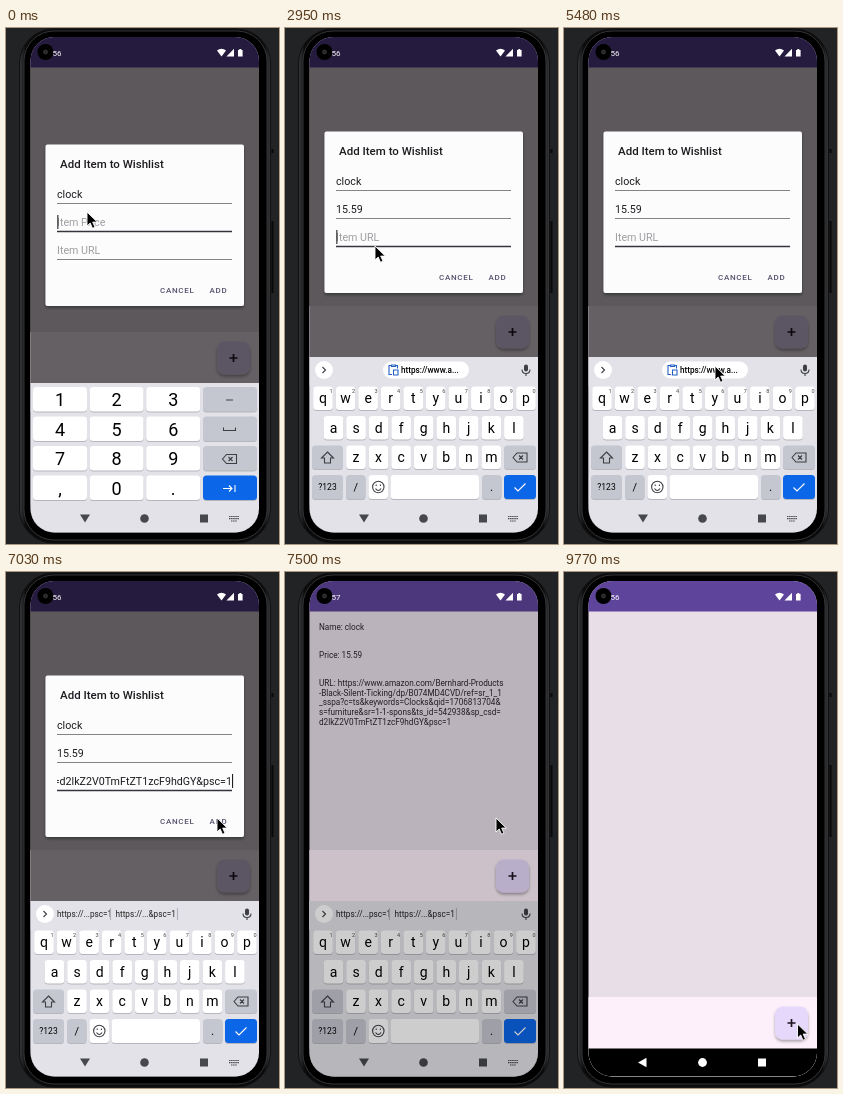
Animation of 273 by 516 pixels, one loop 9790 ms. Source, as an HTML page:

```html
<!DOCTYPE html>
<html lang="en">
<head>
<meta charset="utf-8">
<title>Wishlist demo</title>
<style>
html, body { margin: 0; width: 100%; height: 100%; overflow: hidden; background: #222325; }
svg { display: block; width: 273px; height: 516px; font-family: Roboto, "Liberation Sans", sans-serif; }
text { white-space: pre; }
.mid { text-anchor: middle; }
.medium { font-weight: 500; }
.field { font-size: 10.7px; fill: #1d1b1f; }
.hint { fill: #a09ea1; }
.button { font-size: 8px; font-weight: 500; letter-spacing: .7px; fill: #554f6b; }
.item { font-size: 8.2px; fill: #2a262c; }
.line { fill: none; stroke: #3d3f45; stroke-width: 1.1; }
</style>
</head>
<body>
<svg viewBox="0 0 273 516">
  <defs>
    <clipPath id="screen"><rect x="24.5" y="9" width="228.5" height="495.5" rx="24"/></clipPath>
    <clipPath id="entry"><rect x="51" y="190" width="175" height="50"/></clipPath>
    <filter id="shadow" x="-30%" y="-30%" width="160%" height="170%">
      <feDropShadow dx="0" dy="2" stdDeviation="1.6" flood-opacity=".35"/>
    </filter>
    <linearGradient id="edge">
      <stop offset="0" stop-color="#3a3b3d"/><stop offset=".025" stop-color="#0b0b0c"/>
      <stop offset=".975" stop-color="#0b0b0c"/><stop offset="1" stop-color="#38393b"/>
    </linearGradient>
  </defs>

  <rect width="273" height="516" fill="#222325"/>
  <path d="M266.5 121v4M266.5 193v72" stroke="#080809" stroke-width="2"/>
  <rect x="13.5" y="1" width="251" height="514" rx="34" fill="url(#edge)" stroke="#101011"/>
  <rect x="18" y="3" width="243" height="509" rx="30" fill="#000" stroke="#3f4042" stroke-width=".8"/>

  <g clip-path="url(#screen)">
    <rect x="24" y="9" width="230" height="496" fill="#e8dee8"/>
    <rect x="24" y="9" width="230" height="30.5" fill="#5e449b"/>
    <g id="items"></g>
    <g id="bottom">
      <rect x="24" y="425" width="230" height="80" fill="#fdf0fa"/>
      <rect x="211" y="434.5" width="33" height="33" rx="8" fill="#e6d8fb" filter="url(#shadow)"/>
      <path d="M223.5 451h8M227.5 447v8" stroke="#1a1520" stroke-width="1.7"/>
    </g>
    <rect id="pageDim" x="24" y="9" width="230" height="496"/>
    <rect x="24" y="476.5" width="230" height="28"/>
    <g fill="#fff"><path d="M74 490.500l8.500-4.700v9.400z"/><circle cx="138.500" cy="490.500" r="4.400"/><rect x="194" y="486.500" width="8" height="8"/></g>
    <g id="keyboard">
      <rect id="tray" x="24" width="230" height="200" fill="#e2e2e8"/>
      <g id="numbers"></g>
      <g id="letters"></g>
      <g fill="#46484d">
        <path d="M74 486.500h10l-5 8z"/><circle cx="138.500" cy="490.500" r="4.300"/><rect x="194" y="486.500" width="8" height="8"/>
        <path d="M223 488.500h10M223 490.700h10M225 493h6" stroke="#46484d" stroke-width="1.200" stroke-dasharray="1.500 .6"/>
      </g>
    </g>
    <rect id="fullDim" x="24" y="9" width="230" height="496"/>
    <circle cx="39.500" cy="24" r="8"/>
    <circle cx="39.500" cy="24" r="2" fill="#252729" stroke="#3d4043" stroke-width=".7"/>
    <g fill="#fff">
      <text id="clock" x="46.500" y="28" font-size="8"></text>
      <path d="M211 22.500q4.500-3.500 9 0l-4.500 6zM228 20.800v7.700h-7.500zM232 22h1.300v-1h2v1h1.300v6.500h-4.600z"/>
    </g>
  </g>

  <g id="dialog">
    <rect x="39.500" y="116.500" width="198.500" height="161.500" rx="2" fill="#fdfcfd" filter="url(#shadow)"/>
    <text class="medium" x="54" y="139.500" font-size="11.500" fill="#1d1b1f">Add Item to Wishlist</text>
    <text class="field" x="51" y="170">clock</text>
    <text class="field" id="price" x="51" y="198"></text>
    <g clip-path="url(#entry)"><text class="field" id="url" y="226"></text></g>
    <path id="rules" fill="none" stroke="#858387" d="M51 175.500h175M51 203.500h175M51 231.500h175"/>
    <path id="focus" stroke="#36343b" stroke-width="1.300" d="M51 203.500h175"/>
    <rect id="caret" width="1.100" height="14" fill="#222"/>
    <text class="button" x="154" y="265">CANCEL</text>
    <text class="button" x="203.500" y="265">ADD</text>
  </g>

  <path id="mouse" d="M0 0v14l3.200-3 2.300 5.300 2.500-1.100-2.300-5.100h4.600z" stroke="#fff" stroke-width=".9"/>
</svg>

<script>
const $ = id => document.getElementById(id);
const LOOP = 9790, CUT = 9240;
const CLOSE = 7290, SWITCH = 2650, PASTE = 5750;
const typed = [100, 540, 840, 1320, 1890];
const caretResets = [0, ...typed, 2700, PASTE];
// time, x, y
const route = [
  [0, 81, 184], [2150, 81, 184], [2320, 89, 208], [2500, 90, 218], [4160, 90, 218],
  [5200, 151, 338], [6150, 151, 338], [7000, 211, 246], [8250, 211, 246],
  [8450, 160.5, 172], [CUT - 1, 160.5, 172], [CUT, 176, 310], [9720, 233.5, 452], [LOOP, 233.5, 452]
];

const label = (x, y, size, s, attrs = 'class="mid"') =>
  `<text x="${x}" y="${y}" font-size="${size}" ${attrs}>${s}</text>`;
const box = (x, y, w, h, fill = '#fff', r = 3.5) =>
  `<rect x="${x}" y="${y + 1}" width="${w}" height="${h}" rx="${r}" fill="#b5b6be"/>` +
  `<rect x="${x}" y="${y}" width="${w}" height="${h}" rx="${r}" fill="${fill}"/>`;
const icon = (d, color = '#3d3f45') => `<path class="line" style="stroke:${color}" d="${d}"/>`;
const erase = (x, y) => icon(`M${x - 7} ${y}l4-4.500h10v9h-10zM${x - 1} ${y - 2}l4 4m0-4l-4 4`);
const GREY = '#c5c7d0', BLUE = '#0b66e8';

function numberPad() {
  const rows = ['123', '456', '789', ',0.'];
  return rows.map((row, r) => {
    const y = 359 + r * 29.5;
    return [...row].map((c, i) => box(27 + i * 56.6, y, 54, 24.5) + label(54 + i * 56.6, y + 19.2, 18, c)).join('') +
      box(197, y, 54, 24.5, r < 3 ? GREY : BLUE);
  }).join('') +
    icon('M220 372h7M217.500 399.500v3h12v-3') + erase(223.5, 431) +
    icon('M217 460.500h9m-3-3l3 3-3 3M229 457v7', '#fff');
}

function letterPad() {
  const row = (s, x, y) => [...s].map((c, i) => {
    const cx = x + i * 22.55;
    return box(cx - 9.8, y, 19.6, 23.5) + label(cx, y + 16.5, 14, c);
  }).join('');
  const digits = [...'1234567890'].map((c, i) => label(46 + i * 22.55, 365, 5.5, c, 'class="mid" fill="#444"')).join('');
  return row('qwertyuiop', 38, 358.5) + digits + row('asdfghjkl', 48.5, 388) + row('zxcvbnm', 71, 417.5) +
    box(27, 417.5, 31, 23.5, GREY) + icon('M42.500 424l6 6h-3v5h-6v-5h-3z') +
    box(219, 417.5, 32, 23.5, GREY) + erase(235, 429.5) +
    box(27, 447, 31, 24, GREY) + label(42.5, 462, 8.5, '?123') +
    box(61, 447, 19.5, 24, GREY) + label(70.7, 463, 11, '/') +
    box(83.5, 447, 19.5, 24) + icon('M99 459a5.700 5.700 0 1 0-11.400 0a5.700 5.700 0 1 0 11.400 0M90.500 460.500q2.800 4 5.600 0M91.200 456.500v1.500M95.400 456.500v1.500') +
    box(105.5, 447, 88.5, 24) + box(197, 447, 19.5, 24, GREY) + label(206.7, 463, 12, '.') +
    box(219, 447, 32, 24, BLUE) + icon('M229.500 459.500l3.500 3.500 7.500-7.500', '#fff') +
    '<circle cx="39" cy="342" r="9" fill="#fff"/>' + icon('M37.500 339l3 3-3 3') +
    '<rect x="239" y="336.500" width="4" height="7" rx="2" fill="#3d3f45"/>' + icon('M237 341.500q0 4 4 4t4-4M241 345.500v2.500') +
    `<g id="chip"><rect x="98" y="333.500" width="86" height="17" rx="8.500" fill="#fff"/>` +
    icon('M111 337.500h1.500v3M106 337.500h-2v9h3M106.500 337h4v1.500h-4zM108.500 342h4.500v5h-4.500z', '#2460c4') +
    label(116, 345, 8.2, 'https://www.a...', 'class="medium"') + '</g>' +
    '<g id="links">' + label(51, 345, 8.2, 'https://...psc=1', 'fill="#222"') +
    label(109.5, 345, 8.2, 'https://...&amp;psc=1', 'fill="#222"') + icon('M104.500 336v12M171.500 336v12', '#b0b1b8') + '</g>';
}

function itemList() {
  const url = ['URL: https://www.amazon.com/Bernhard-Products', '-Black-Silent-Ticking/dp/B074MD4CVD/ref=sr_1_1',
    '_sspa?c=ts&amp;keywords=Clocks&amp;qid=1706813704&amp;', 's=furniture&amp;sr=1-1-spons&amp;ts_id=542938&amp;sp_csd=',
    'd2lkZ2V0TmFtZT1zcF9hdGY&amp;psc=1'];
  const line = (y, s) => label(34, y, 8.2, s, 'class="item"');
  return line(58, 'Name: clock') + line(86, 'Price: 15.59') + url.map((s, i) => line(114 + i * 9.7, s)).join('');
}

$('numbers').innerHTML = numberPad();
$('letters').innerHTML = letterPad();
$('items').innerHTML = itemList();

const ramp = (t, a, b) => Math.min(1, Math.max(0, (t - a) / (b - a)));
const ease = p => p * p * (3 - 2 * p);
const show = (id, on) => $(id).setAttribute('visibility', on ? 'inherit' : 'hidden');
const move = (id, x, y) => $(id).setAttribute('transform', `translate(${x} ${y})`);
const setText = (id, s, hint) => {
  $(id).textContent = s || hint;
  $(id).classList.toggle('hint', !s);
};

function draw(t) {
  const onUrl = t >= SWITCH, pasted = t >= PASTE, closing = t >= CLOSE;
  const rise = ease(ramp(t, SWITCH, 2850)), slide = ease(ramp(t, 7550, 7920));
  const trayTop = 355 - 26 * rise, pageEnd = trayTop + (476 - trayTop) * slide;

  show('items', closing && t < CUT);
  move('bottom', 0, pageEnd - 476);
  move('keyboard', 0, slide * 180);
  show('keyboard', slide < 1);
  $('tray').setAttribute('y', trayTop);
  show('numbers', !onUrl);
  show('letters', onUrl);
  show('chip', !pasted);
  show('links', pasted);
  $('clock').textContent = t >= 7170 && t < CUT ? '57' : '56';

  const dim = .6 * (1 - ramp(t, 7300, 7600));
  $('pageDim').setAttribute('opacity', closing ? 0 : dim);
  $('fullDim').setAttribute('opacity', closing ? dim : 0);

  const fade = 1 - ramp(t, CLOSE, 7440);
  $('dialog').setAttribute('opacity', fade);
  show('dialog', fade > 0);
  move('dialog', 0, -13 * rise);
  const price = '15.59'.slice(0, typed.filter(at => t >= at).length);
  setText('price', price, 'Item Price');
  setText('url', pasted ? '=d2lkZ2V0TmFtZT1zcF9hdGY&psc=1' : '', 'Item URL');
  $('url').setAttribute('x', pasted ? 226 : 51);
  $('url').setAttribute('text-anchor', pasted ? 'end' : 'start');
  move('focus', 0, onUrl ? 28 : 0);

  const reset = caretResets.filter(at => t >= at).pop();
  const caretX = pasted ? 226 : !onUrl && price ? 51.3 + $('price').getComputedTextLength() : 51.3;
  move('caret', caretX, onUrl ? 215 : 187);
  show('caret', !closing && (t - reset) % 1000 < 500);

  const i = route.findIndex(p => p[0] > t), [t0, x0, y0] = route[i - 1], [t1, x1, y1] = route[i];
  const p = ease(ramp(t, t0, t1));
  move('mouse', x0 + (x1 - x0) * p, y0 + (y1 - y0) * p);
}

const start = performance.now();
function tick() {
  draw((performance.now() - start) % LOOP);
  requestAnimationFrame(tick);
}
tick();
</script>
</body>
</html>
```
